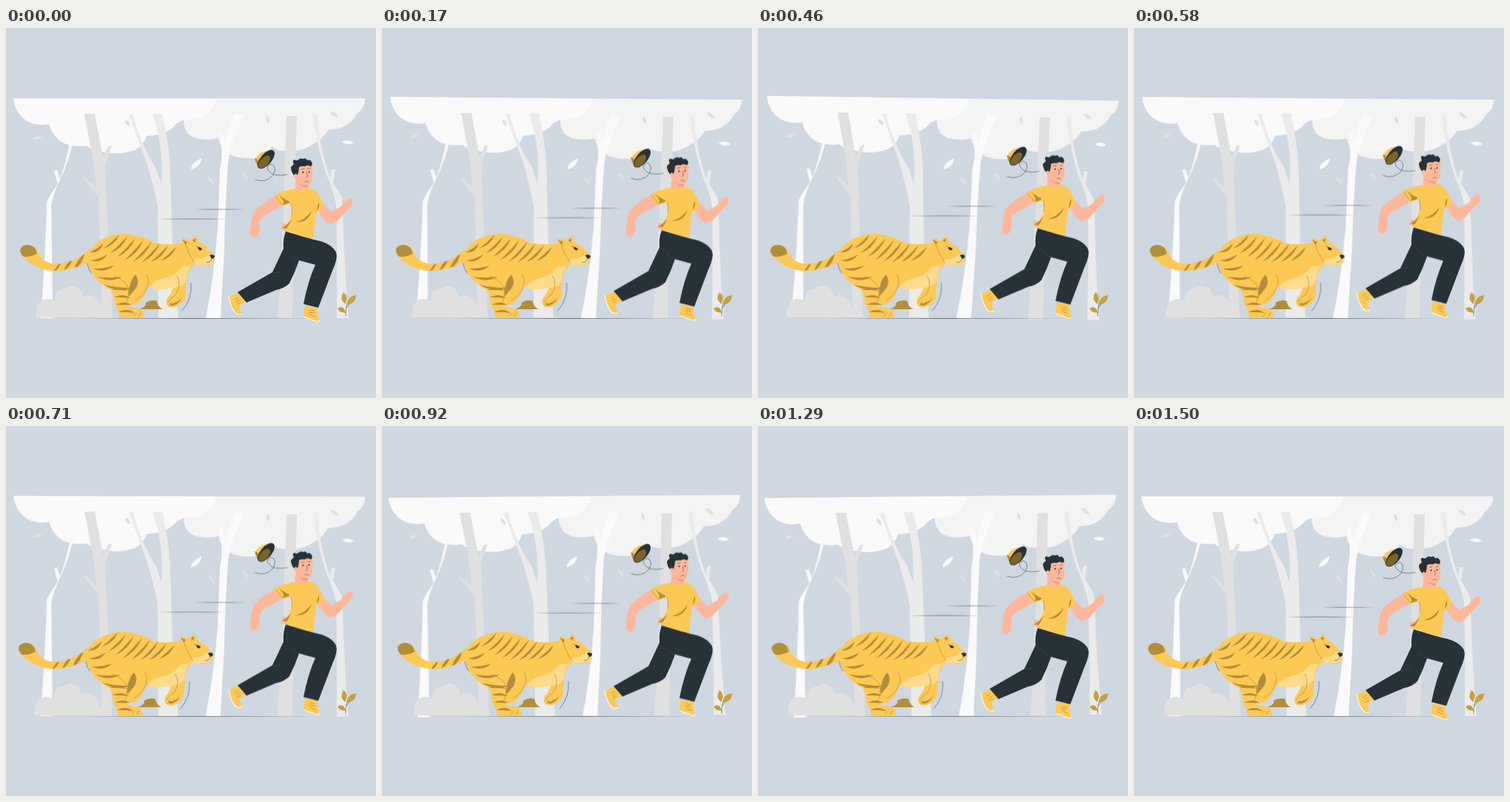
An HTML page for the animation above (1.54 s loop, 500 px wide and 500 px high).

```html
<!DOCTYPE html>
<html lang="en">
<head>
<meta charset="utf-8">
<title>Chase in the woods</title>
<style>
  html, body { margin: 0; width: 100%; height: 100%; overflow: hidden; background: #cfd7e1; }
  svg { display: block; width: 100%; height: 100%; }
  #trees { transform-origin: 247px 243px; }
  .white { fill: #fafafa; }
  .pale { fill: #ebebeb; }
  .grey { fill: #e0e0e0; }
  .gold { fill: #fdc955; }
  .brown { fill: #b18d3c; }
  .cream { fill: #fedc8c; }
  .skin { fill: #ffb79b; }
  .ink { fill: #263238; }
  .line { fill: none; stroke: #263238; stroke-width: .5; stroke-linecap: round; }
  .seam { fill: none; stroke: #b18d3c; stroke-width: .7; stroke-linecap: round; }
</style>
</head>
<body>
<svg viewBox="0 0 500 500">
  <defs>
    <clipPath id="coat"><use href="#tail"/><use href="#body"/></clipPath>
  </defs>

  <g id="trees">
    <path fill="#f4f4f4" d="M236 95H485Q486 107 475 115Q468 128 455 134Q445 138 436 137Q428 150 415 157Q402 166 385 166Q366 167 359 160Q353 173 335 176Q310 178 297 167Q289 160 287 149Q270 153 254 148Q239 141 240 122Z"/>
    <path class="white" d="M10 95H284Q281 107 271 117Q259 126 243 123Q232 126 225 135Q213 145 190 146Q186 159 174 165Q155 172 135 168Q115 166 109 159Q83 162 71 151Q61 142 58 130Q36 134 22 121Q11 110 10 95Z"/>
    <path class="white" stroke="#f2f2f2" stroke-width=".4" d="M92 116H96Q91 165 77 196Q62 227 61 241Q62 300 63 392H47Q54 300 55 236Q57 229 70 211L65 193L69 192L73 204Q86 170 92 116Z"/>
    <path class="grey" d="M106 116H120L131 175L138 160L143 159L134 186L136 240L144 392H130L125 228L105 204L107 202L122 216L118 180Z"/>
    <path class="pale" d="M198 116H211Q222 165 222 200L225 290L233 392H206L205 242Q203 226 191 185L166 117L171 116Q183 160 203 190L210 211Q214 165 198 116Z"/>
    <path class="white" d="M308 117H322Q304 155 300 182Q296 240 295 300L290 392H270Q282 330 286 270L289 190Q293 174 291 158L288 140L292 139L297 157Q299 140 308 117Z"/>
    <path class="grey" d="M379 119H393L390 220L387 392H367Q374 290 376 210Z"/>
    <path class="pale" d="M415 117H421Q424 165 438 202L440 191L445 191L442 209L453 227Q455 235 455 250Q457 320 463 392H447Q448 300 446 240Q445 226 432 196Q418 150 415 117Z"/>
    <path class="white" d="M250 191Q250 182 264 176Q263 188 250 191ZM454 154Q462 149 470 155Q462 160 454 154Z"/>
    <path class="grey" d="M37 150Q42 144 49 146Q45 152 37 150ZM161 124Q168 125 168 133Q161 132 161 124ZM273 201Q280 203 281 211Q275 209 273 201ZM319 195Q326 197 327 205Q320 203 319 195ZM352 118Q358 122 355 129Q350 125 352 118ZM438 113Q446 112 449 121Q441 121 438 113Z"/>
  </g>

  <path class="ink" opacity=".8" d="M91 392.300Q250 391.600 422 392.300Q250 393.200 91 392.300Z"/>
  <path class="line" d="M459 389Q459 375 462 369M459 385L453 381M460 378L466 370"/>
  <path fill="#c9a03a" d="M458 373Q450 366 456 357Q464 363 458 373ZM461 374Q461 363 473 361Q473 372 461 374ZM459 384Q451 386 448 379Q456 374 459 384Z"/>

  <g id="tiger">
    <path class="grey" d="M41 391Q39 367 57 366L66 368Q66 353 80 352Q89 345 98 351Q104 356 104 363Q115 358 122 366Q129 371 129 378Q137 380 138 391Z"/>
    <path class="brown" d="M180 380Q190 377 189 371Q197 366 204 369Q205 377 212 380Z"/>
    <path id="tail" class="gold" d="M113 299Q100 311 82 317Q58 323 46 309Q42 293 29 293Q19 294 19 301Q23 314 42 323Q72 336 110 317Z"/>
    <path class="brown" d="M19 301Q20 293 30 293Q40 294 42 305Q33 310 24 309Q20 306 19 301Z"/>
    <path id="body" class="gold" d="M110 308Q114 295 127 287Q145 277 164 278Q185 281 202 291Q224 294 239 290Q236 285 240 284L250 288Q253 280 258 282L260 289Q270 293 276 302Q283 306 282 310Q282 318 275 320Q266 323 255 319Q246 326 244 339Q243 357 242 366Q234 379 221 377Q214 373 218 365Q223 360 226 350Q206 355 191 350Q188 364 179 371Q173 375 165 374L166 377Q176 378 183 381Q188 386 186 392H153Q154 382 147 374Q146 360 142 354Q110 337 110 308Z"/>
    <path class="cream" d="M193 351Q199 341 214 338Q229 335 238 322Q247 323 251 319Q244 328 243 343Q239 350 226 351Q208 355 193 351ZM253 319Q252 312 264 312Q271 309 275 305L280 309Q281 318 275 319Q263 322 253 319Z"/>
    <path id="stripes" class="brown" clip-path="url(#coat)"/>
    <path class="brown" d="M166 363Q165 344 175 333Q181 341 176 351ZM238 286L245 289L243 293ZM252 287L256 284L256 290ZM221 372Q230 374 238 364Q232 376 223 375Z"/>
    <path class="seam" d="M146 335Q160 341 165 350Q167 364 162 372M190 333Q195 341 190 352Q186 362 175 368M231 335Q238 347 229 361Q222 364 219 371M242 291Q246 305 255 318M220 376L224 370M226 376L229 370M172 390L176 385M179 390L182 385"/>
    <path class="ink" d="M275 307Q280 305 282 308Q282 311 278 312ZM259 297Q262 295 265 299Q262 303 259 297Z"/>
    <path class="line" d="M257 295L265 298M278 311Q278 317 271 317M250 345Q252 366 238 382M110 318Q111 326 115 331"/>
  </g>

  <g id="runner">
    <path class="ink" d="M254 245Q289 244.400 324 245Q289 245.700 254 245ZM203 258Q251 257.400 300 258Q251 258.700 203 258Z"/>

    <path class="gold" d="M338 182Q336 172 346 168Q352 165 357 166L343 190Q340 188 338 182Z"/>
    <path class="brown" d="M336 176Q342 177 344 185L342 189Q338 185 336 176Z"/>
    <ellipse class="ink" cx="351.500" cy="177.500" rx="15.500" ry="7.500" transform="rotate(-50 351.500 177.500)"/>
    <ellipse cx="349" cy="181" rx="10.500" ry="5.500" fill="#7d6329" transform="rotate(-48 349 181)"/>
    <path class="line" d="M337 205Q351 210 361 199Q367 188 359 184Q351 186 354 192Q361 202 380 198"/>

    <path class="skin" d="M364 227Q349 234 335 248Q331 259 331 266Q327 276 332 282Q337 286 341 279Q344 268 342 264Q344 257 350 253L373 240Z"/>
    <path class="skin" d="M422 247Q427 260 437 265Q443 266 449 259L463 244Q470 239 468 232L465 229Q460 233 456 236Q453 242 450 243L439 249L429 238Z"/>
    <path class="skin" d="M374 264L372 271L381 277L390 268ZM391 196Q387 200 392 205L390 221Q400 227 410 220L408 213Q414 211 414 201V185Q402 181 393 188Z"/>
    <path fill="#f09a7c" d="M396 210Q401 213 408 213V215Q400 216 396 210Z"/>
    <path class="ink" d="M389 199Q385 194 385 188Q387 186 389 184Q386 179 390 178Q393 180 395 178Q398 175 401 177Q406 175 407 179Q411 177 413 181Q415 184 412 187Q407 184 404 187Q399 186 396 188Q396 193 394 199Q392 195 389 199Z"/>
    <circle class="ink" cx="401.500" cy="195" r="1.100"/>
    <circle class="ink" cx="409.500" cy="194.500" r="1.100"/>
    <path class="line" d="M399 191L403 190M408 190L411 190M406 195Q409 201 406 202M404 208Q407 206 409 208"/>

    <path class="gold" d="M313 357L325 370Q318 372 315 377L319 386Q314 389 309 384Q302 373 301 362Q308 362 313 357ZM404 375L421 378Q419 386 424 394Q424 397 418 396L402 390Q402 381 404 375Z"/>
    <path fill="none" stroke="#fafafa" stroke-width="1.200" d="M301 362Q303 377 310 385Q314 389 319 386M402 390L418 396Q424 398 424 394"/>
    <path class="seam" d="M309 367L314 364M311 370L317 367M312 373L317 371M411 381L417 382M410 384L417 385M411 387L418 390"/>
    <path class="ink" d="M378 275L416 286Q439 290 446 303Q449 311 441 328Q432 352 422 378L402 373Q408 342 418 320L396 314Q391 329 383 345Q376 352 365 354L325 371L313 357L360 330Q369 311 375 298Q374 285 378 275Z"/>
    <path d="M396 314Q389 312 384 305M360 330Q367 332 373 327" fill="none" stroke="#46535a" stroke-width=".6"/>
    <path class="gold" d="M363 226Q373 220 391 217Q400 223 409 216Q417 217 422 225Q428 234 430 242L421 248Q418 251 418 258L415 285Q392 281 373 270Q386 262 387 247L385 237L373 241Q366 234 363 226Z"/>
    <path class="brown" d="M392 262Q405 259 413 247Q408 264 392 262ZM373 270Q382 265 386 258Q383 266 379 271ZM368 225Q381 235 383 234Q385 237 373 239Q379 236 368 225ZM423 235Q424 243 420 247L421 240Z"/>
    <path class="seam" d="M385 237Q388 243 386 252M365 228Q370 236 374 239"/>
  </g>
</svg>
<script>
  const LOOP = 1540, CYCLE = 1500;
  const $ = id => document.getElementById(id);
  const range = (n, f) => Array.from({ length: n }, (_, i) => f(i));

  // Tapered stripe from (x, y) along (dx, dy), bent sideways by `bend`
  const stripe = (x, y, dx, dy, bend, w) => {
    const len = Math.hypot(dx, dy), nx = -dy / len, ny = dx / len;
    const side = k => `${x + dx / 2 + nx * k} ${y + dy / 2 + ny * k}`;
    return `M${x} ${y}Q${side(bend + w)} ${x + dx} ${y + dy}Q${side(bend - w)} ${x} ${y}Z`;
  };
  const arch = t => Math.sin(Math.PI * t);
  $("stripes").setAttribute("d", [
    ...range(8, i => stripe(153 + 11 * i, 279 + 2.4 * i, -21 - 5 * arch(i / 7), 19 + 9 * arch(i / 7), -4, 3.2)),
    ...range(5, i => stripe(113 + 1.2 * i * i, 303 + 11 * i, 18 + 5 * i, 4 * i - 12, 6, 3.5)),
    ...range(4, i => stripe(143 + 3 * i, 354 + 10 * i, 22, 1, -4, 3.2)),
    ...range(3, i => stripe(64 + 14 * i, 330 - 2 * i, 10 + 2 * i, -13 - 4 * i, 1, 3 + i))
  ].join(""));

  // Evenly spaced poses over one cycle, then a short rest
  const play = (id, values, pose, easing = "linear") => {
    const last = values.length - 1;
    const keys = values.map((v, i) => ({ offset: i / last * CYCLE / LOOP, transform: pose(v), easing }));
    keys.push({ offset: 1, transform: pose(values[last]) });
    $(id).animate(keys, { duration: LOOP, iterations: Infinity }).startTime = 0;
  };

  // The shake alternates sides, doubling up to its full width and back
  const shake = i => i % 10 && (i % 2 ? -1 : 1) * Math.min(2.4, .3 * 2 ** Math.min(i, 10 - i));

  play("trees", [0, 1, 0, -1, 0], a => `rotate(${a}deg)`);
  play("runner", [0, -7, 0], y => `translateY(${y}px)`);
  play("tiger", range(11, shake), x => `translateX(${x}px)`, "cubic-bezier(.36,.07,.19,.97)");
</script>
</body>
</html>
```
